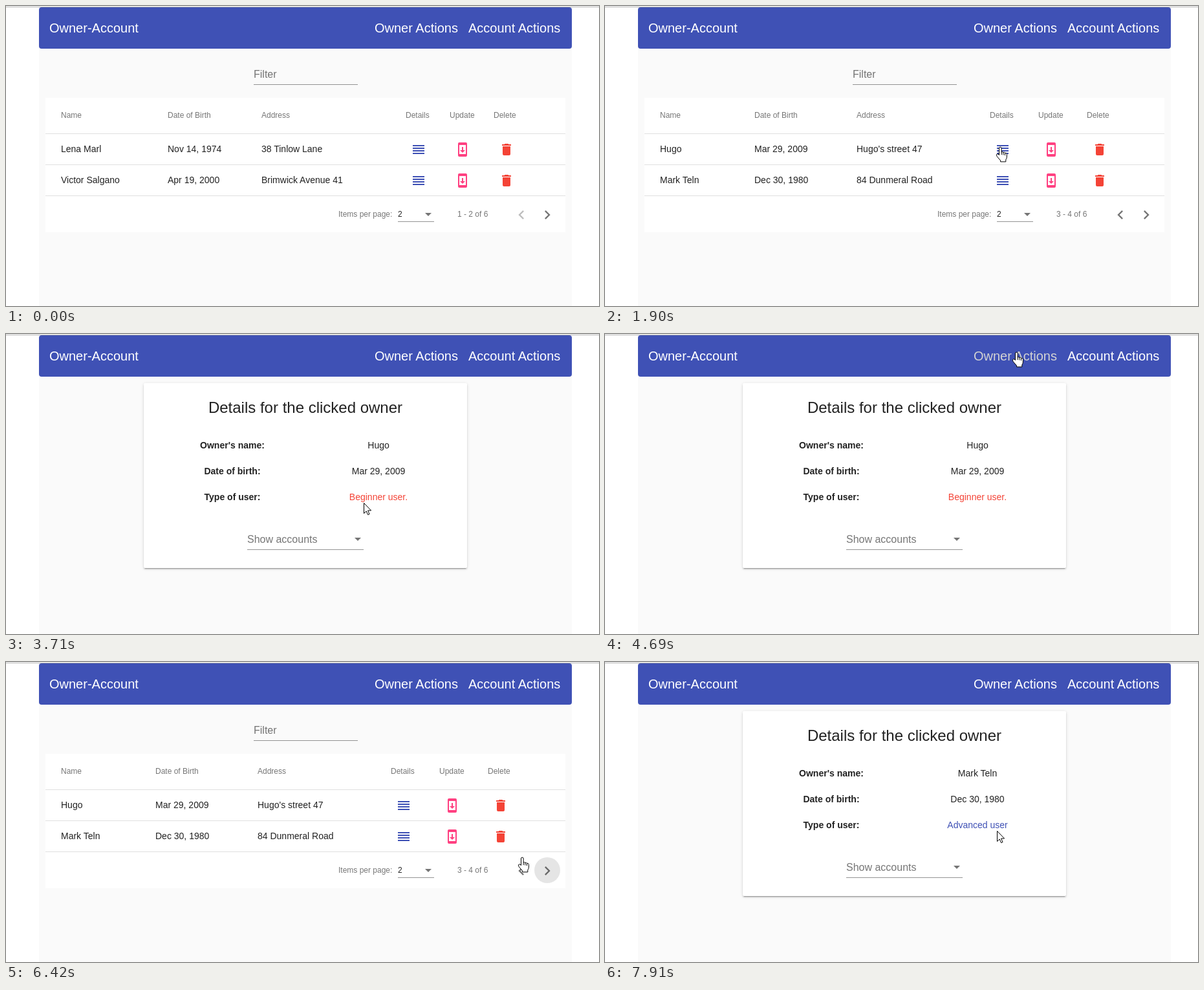
Animation, 917 px wide and 464 px high, one loop 7.99 s. Source, as an HTML page:

```html
<!DOCTYPE html>
<html lang="en">
<head>
<meta charset="utf-8">
<title>Owner-Account</title>
<style>
  html, body { margin: 0; width: 100%; height: 100%; overflow: hidden; background: #fff; }
  #stage { position: relative; width: 917px; height: 464px; overflow: hidden; }
  #stage > * { position: absolute; }
  .line { left: 0; top: 1px; width: 917px; height: 1px; background: #b5b5b5; }
  .page { left: 51px; top: 2px; width: 824px; height: 462px; background: #fafafa; }
  .bar { left: 51px; top: 2px; width: 824px; height: 64px; border-radius: 4px; background: #3f51b5; }
  #table { left: 61px; top: 142px; width: 804px; height: 208px; background: #fff; }
  #card {
    left: 213px; top: 76px; width: 500px; height: 286px; border-radius: 2px; background: #fff;
    box-shadow: 0 3px 1px -2px rgba(0,0,0,.2), 0 2px 2px rgba(0,0,0,.14), 0 1px 5px rgba(0,0,0,.12);
  }
  svg { left: 0; top: 0; }
  text { font: 14px "Liberation Sans", Arial, sans-serif; fill: rgba(0,0,0,.87); white-space: pre; }
  .head { font-size: 20px; fill: #fff; }
  .small { font-size: 12px; fill: rgba(0,0,0,.54); }
  .dark { font-size: 12px; }
  .field { font-size: 16px; fill: rgba(0,0,0,.54); }
  .title { font-size: 24px; }
  .bold { font-weight: bold; }
  .tip { font-size: 10px; fill: #fff; stroke: #fff; stroke-width: .25; }
  .mid { text-anchor: middle; }
  .blue { fill: #3f51b5; }
  .pink { fill: #ff4081; }
  .red { fill: #f44336; }
  .grey { fill: rgba(0,0,0,.54); }
  .pale { fill: rgba(0,0,0,.26); }
  .rule { fill: rgba(0,0,0,.12); }
  .under { fill: rgba(0,0,0,.42); }
  .cursor path { fill: #fff; stroke: #000; stroke-linejoin: round; }
</style>
</head>
<body>
<div id="stage">
  <div class="page"></div>
  <div class="line"></div>
  <div class="bar"></div>
  <div id="table"></div>
  <div id="card"></div>
  <svg width="917" height="464">
    <text class="head" x="67" y="41">Owner-Account</text>
    <text class="head" id="ownerLink" x="570" y="41">Owner Actions</text>
    <text class="head" x="715" y="41">Account Actions</text>
    <g id="scenes"></g>
    <circle id="ripple"/>
    <g id="tooltip">
      <rect x="806" y="265" width="62" height="23" rx="2" fill="#616161" fill-opacity=".92"/>
      <text class="tip mid" x="837" y="280">Next page</text>
    </g>
    <g id="cursor" class="cursor">
      <path id="arrow" d="M.5.5V16.5L4.2 13 6.6 18.6 9 17.6 6.6 12H11.6Z"/>
      <g id="hand" transform="translate(-6 -.5)">
        <path d="M4.5 13V2.5a1.8 1.8 0 0 1 3.6 0V8.6q1.6-1 2.8.4q1.6-.8 2.6.7q2.5-.4 2.9 2V15.5q0 2.8-1.6 4.7V23.4H6.6V21.5L1.2 15.2Q-.6 12 1.4 11.3Q3 11 4.5 13Z"/>
        <path d="M8.1 8.6v4M10.9 9v4M13.5 10v3.5"/>
      </g>
      <path id="beam" d="M-3-7.5H3M.5-7.5V8.5M-3 8.5H3"/>
    </g>
  </svg>
</div>
<script>
const LOOP = 7990;
const $ = id => document.getElementById(id);
const clamp = v => Math.max(0, Math.min(1, v));

const ICONS = {
  blue: 'M3 5h18v2H3zM3 9h18v2H3zM3 13h18v2H3zM3 17h18v2H3z',
  pink: 'M7 1h10a2 2 0 0 1 2 2v18a2 2 0 0 1-2 2H7a2 2 0 0 1-2-2V3a2 2 0 0 1 2-2zM17 19V5H7v14zM16 13h-3V8h-2v5H8l4 4z',
  red: 'M6 19a2 2 0 0 0 2 2h8a2 2 0 0 0 2-2V7H6zM19 4h-3.5l-1-1h-5l-1 1H5v2h14z'
};
const PREV = 'M15.4 7.4L14 6l-6 6 6 6 1.4-1.4L10.8 12z';
const NEXT = 'M8.6 16.6L13.2 12 8.6 7.4 10 6l6 6-6 6z';

const text = (cls, x, y, s) => `<text class="${cls}" x="${x}" y="${y}">${s}</text>`;
const rect = (cls, x, y, w) => `<rect class="${cls}" x="${x}" y="${y}" width="${w}" height="1"/>`;
const icon = (cls, d, x, y, size = 24) =>
  `<path class="${cls}" d="${d}" transform="translate(${x - size / 2} ${y - size / 2}) scale(${size / 24})"/>`;
const caret = (x, y) => `<path class="grey" d="M${x} ${y}h10l-5 5z"/>`;

function listView({ cols, icons, rows, range, first }) {
  const heads = ['Name', 'Date of Birth', 'Address'].map((s, i) => text('small', cols[i], 173, s))
    .concat(['Details', 'Update', 'Delete'].map((s, i) => text('small', icons[i] - 20, 173, s)));
  const body = rows.map((row, r) =>
    row.map((s, i) => text('', cols[i], 226 + 48 * r, s)).join('') +
    Object.keys(ICONS).map((k, i) => icon(k, ICONS[k], icons[i], 222 + 48 * r)).join(''));
  return text('field', 383, 111, 'Filter') + rect('under', 383, 121, 161) +
    heads.join('') + body.join('') +
    [197, 245, 293].map(y => rect('rule', 61, y, 804)).join('') +
    text('small', 514, 326, 'Items per page:') + text('dark', 606, 326, '2') +
    rect('under', 606, 333, 56) + caret(648, 320) + text('small', 698, 326, range) +
    icon(first ? 'pale' : 'grey', PREV, 797, 323, 28) + icon('grey', NEXT, 837, 323, 28);
}

function detailView(name, born, type, colour) {
  const labels = ["Owner's name:", 'Date of birth:', 'Type of user:'];
  return text('title mid', 463, 122, 'Details for the clicked owner') +
    labels.map((s, i) => text('bold mid', 350, 177 + 40 * i, s)).join('') +
    text('mid', 576, 177, name) + text('mid', 576, 217, born) +
    text('mid ' + colour, 576, 257, type) +
    text('field', 373, 323, 'Show accounts') + caret(539, 315) + rect('under', 373, 333, 180);
}

const lists = [
  { cols: [85, 250, 395], icons: [638, 706, 774], range: '1 - 2 of 6', first: true,
    rows: [['Lena Marl', 'Nov 14, 1974', '38 Tinlow Lane'],
           ['Victor Salgano', 'Apr 19, 2000', 'Brimwick Avenue 41']] },
  { cols: [85, 231, 389], icons: [615, 690, 765], range: '3 - 4 of 6', first: false,
    rows: [['Hugo', 'Mar 29, 2009', "Hugo's street 47"],
           ['Mark Teln', 'Dec 30, 1980', '84 Dunmeral Road']] }
];
const views = [
  ...lists.map(listView),
  detailView('Hugo', 'Mar 29, 2009', 'Beginner user.', 'red'),
  detailView('Mark Teln', 'Dec 30, 1980', 'Advanced user', 'blue')
];
$('scenes').innerHTML = views.map(v => `<g>${v}</g>`).join('');
const groups = [...$('scenes').children];

// [start time, view]
const cuts = [[0, 0], [965, 1], [2285, 2], [5260, 0], [6185, 1], [7135, 3]];

// Each move takes `count` held steps and sets out from where the last one stopped
const moves = [];
let spot = [895, 400];
function move(start, end, count, ...keys) {
  moves.push({ start, count, gap: (end - start) / (count - 1) || 1, keys: [[-1, ...spot], ...keys] });
  spot = keys[keys.length - 1].slice(1);
}
const next = [834, 322], row = [613, 267];
move(200, 750, 8, [7, 834, 320]);
move(890, 1680, 11, [3, 834, 320], [10, 607, 228]);
move(1750, 1900, 3, [2, 611, 218]);
move(2770, 2930, 3, [2, 588, 280]);
move(3080, 3860, 11, [3, 622, 266], [8, 553, 261], [10, 556, 268]);
move(3940, 4690, 11, [10, 636, 28]);
move(4810, 5090, 4, [1, 632, 9], [3, 634, 38]);
move(5260, 6030, 11, [2, 771, 234], [4, 836, 372], [10, ...next]);
move(6110, 6820, 10, [1, ...next], [4, 798, 302], [9, ...row]);
move(7060, 7450, 6, [1, ...row], [5, 627, 273]);
move(7610, 7610, 1, [0, 626, 272]);
move(7760, 7910, 3, [2, 606, 261]);

// [click time, x, y, end time]
const clicks = [[890, 837, 322, 1600], [2200, 615, 222, 2285], [6110, 837, 322, 6820], [7060, 615, 270, 7135]];
const tips = [[590, 1200], [5860, 6260]];

const last = (list, t) => list.filter(e => e[0] <= t + 8).pop();

function cursorAt(t) {
  const now = moves.filter(m => m.start <= t + 8).pop();
  if (!now) return null;
  const { start, count, gap, keys } = now;
  const step = Math.min(count - 1, Math.floor((t - start + 8) / gap));
  const i = keys.findIndex(k => k[0] >= step);
  const a = keys[i - 1], b = keys[i];
  const p = (step - a[0]) / (b[0] - a[0]);
  return [1, 2].map(n => Math.round(a[n] + (b[n] - a[n]) * p));
}

const within = (x, y, x0, y0, x1, y1) => x >= x0 && x <= x1 && y >= y0 && y <= y1;
const onLink = (x, y) => within(x, y, 570, 22, 700, 46);

function cursorKind(x, y, view) {
  if (onLink(x, y)) return 'hand';
  if (view > 1) {
    const onText = within(x, y, 535, 204, 617, 221) || within(x, y, 531, 244, 621, 258);
    return onText ? 'beam' : 'arrow';
  }
  const near = (cx, cy) => Math.abs(x - cx) <= 20 && Math.abs(y - cy) <= 20;
  const hot = near(797, 322) || near(837, 322) ||
    lists[view].icons.some(cx => near(cx, 222) || near(cx, 270));
  return hot ? 'hand' : 'arrow';
}

const show = (el, on) => { el.style.display = on ? '' : 'none'; };

function draw(t) {
  const view = last(cuts, t)[1];
  groups.forEach((g, i) => show(g, i === view));
  show($('table'), view < 2);
  show($('card'), view > 1);

  const pos = cursorAt(t);
  show($('cursor'), pos);
  if (pos) {
    $('cursor').setAttribute('transform', `translate(${pos})`);
    const kind = cursorKind(...pos, view);
    ['arrow', 'hand', 'beam'].forEach(k => show($(k), k === kind));
  }
  $('ownerLink').style.fill = pos && onLink(...pos) ? '#d3d3d3' : '#fff';

  const click = last(clicks, t);
  const live = click && t < click[3];
  show($('ripple'), live);
  if (live) {
    const age = Math.max(0, t - click[0]);
    const set = (k, v) => $('ripple').setAttribute(k, v);
    set('cx', click[1]);
    set('cy', click[2]);
    set('r', 20 * Math.min(1, .4 + age / 300));
    set('fill-opacity', .1 * clamp((700 - age) / 300));
  }

  const tip = last(tips, t);
  const size = tip ? Math.min(clamp((t - tip[0]) / 150), clamp((tip[1] + 100 - t) / 100)) : 0;
  show($('tooltip'), size > 0);
  $('tooltip').setAttribute('transform', `translate(837 288) scale(${size}) translate(-837 -288)`);
}

const began = performance.now();
function tick() {
  draw((performance.now() - began) % LOOP);
  requestAnimationFrame(tick);
}
tick();
</script>
</body>
</html>
```
